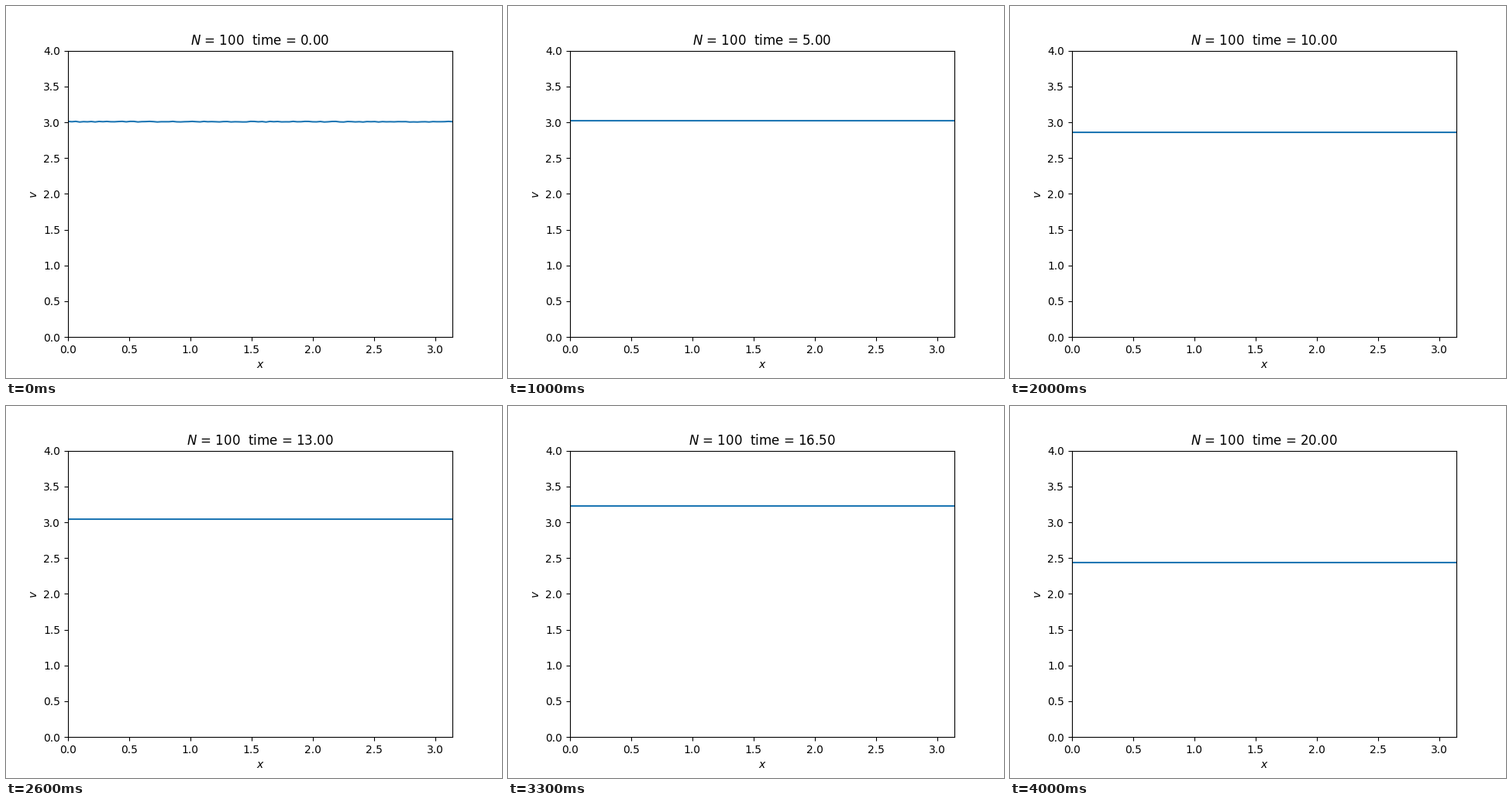
These frames come from a looping animation (640 px wide and 480 px high, 4100 ms). A matplotlib script:

```python
import numpy as np
import matplotlib.pyplot as plt
from matplotlib.animation import FuncAnimation

N = 100
STEP = 0.5
FRAMES = 41
REST = 3.0

x = np.linspace(0, np.pi, N)
noise = 0.01 * np.random.default_rng(4).random(N)

# Large swings: (time, deviation, slope), joined by cubic curves.
SWING = [(13, 0.04, 0.21), (15.4, 0.45, 0), (18, -0.465, -0.5),
         (19.05, -0.805, 0), (20, -0.565, 0.44)]


def hermite(t, start, end):
    (t0, v0, m0), (t1, v1, m1) = start, end
    span = t1 - t0
    u = (t - t0) / span
    ease = u * u * (3 - 2 * u)
    bend = u * (1 - u) * ((1 - u) * m0 - u * m1) * span
    return v0 + (v1 - v0) * ease + bend


def deviation(t):
    """Oscillation growing around the steady state, skewed once large."""
    for start, end in zip(SWING, SWING[1:]):
        if start[0] <= t <= end[0]:
            return hermite(t, start, end)
    return 0.228 * np.exp(0.17 * (t - 12)) * np.sin(0.757 * (t - 12.8))


def profile(t):
    # Diffusion flattens the initial noise almost at once.
    ripple = (noise - noise.mean()) * np.exp(-12 * t)
    return REST + deviation(t) + ripple


fig, ax = plt.subplots(figsize=(6.4, 4.8), dpi=100)
line, = ax.plot(x, profile(0))
ax.set_xlim(0, np.pi)
ax.set_ylim(0, 4)
ax.set_xlabel("$x$")
ax.set_ylabel("$v$")
title = ax.set_title("", pad=5.28)


def update(i):
    t = i * STEP
    line.set_ydata(profile(t))
    title.set_text(f"$N$ = {N}  time = {t:.2f}")
    return line, title


anim = FuncAnimation(fig, update, frames=FRAMES, interval=100,
                     repeat=True, repeat_delay=0)
plt.show()
```
